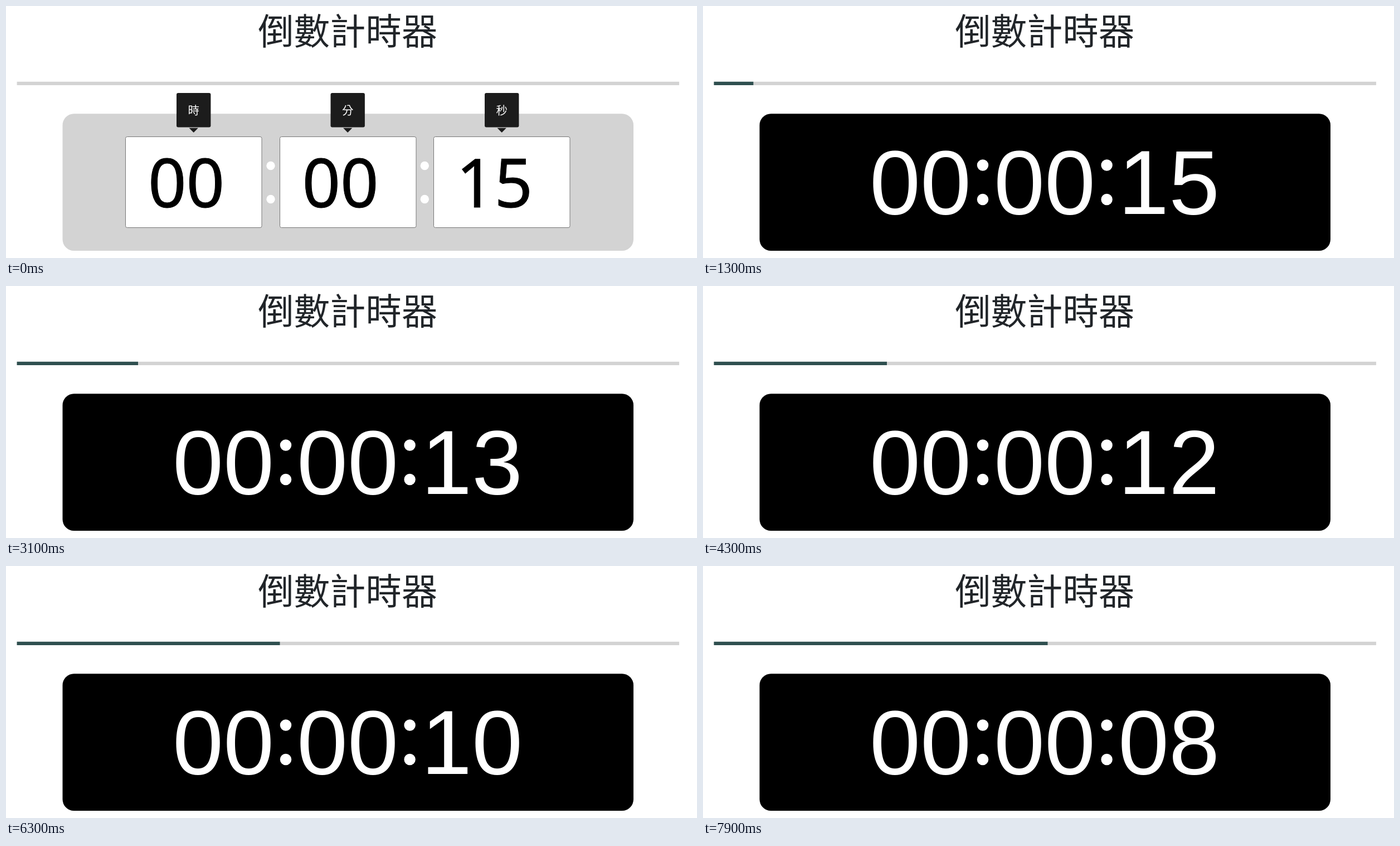
An HTML page that plays this animation: 1240x452 px, repeating every 8 s.

```html
<!DOCTYPE html>
<html lang="zh-TW">
<head>
<meta charset="utf-8">
<title>倒數計時器</title>
<style>
  html, body { margin: 0; width: 100%; height: 100%; overflow: hidden; background: #fff; }
  svg { display: block; width: 1240px; height: 452px; }
  text { white-space: pre; }
  .title, .tip text { font-family: "Noto Sans CJK TC", "Noto Sans CJK", sans-serif; text-anchor: middle; }
  .title { font-size: 64.4px; fill: #212529; }
  .tip { fill: #1c1c1c; }
  .tip text { font-size: 20.48px; fill: #fff; }
  .field { fill: #fff; stroke: #767676; }
  .value { font: 120px "Noto Sans", "Open Sans", sans-serif; text-anchor: middle; stroke: #000; }
  .digits { font: 163.84px "Liberation Sans", Arial, sans-serif; }
  #run { fill: #fff; }
</style>
</head>
<body>
<svg viewBox="0 0 1240 452">
  <text class="title" x="613.3" y="69">倒數計時器</text>
  <rect x="19.6" y="135.8" width="1188.4" height="6.2" fill="#d3d3d3"/>
  <rect id="bar" x="19.6" y="135.8" width="0" height="6.2" fill="#2f4f4f"/>
  <rect id="panel" x="101.5" y="193.2" width="1024.5" height="245.9" rx="20.48" fill="#d3d3d3"/>
  <g id="setup">
    <g fill="#fff">
      <circle cx="475" cy="286.5" r="7.7"/><circle cx="475" cy="346.5" r="7.7"/>
      <circle cx="751.3" cy="286.5" r="7.7"/><circle cx="751.3" cy="346.5" r="7.7"/>
    </g>
  </g>
  <g id="run" visibility="hidden">
    <text class="digits" x="299" y="373">00</text>
    <circle cx="502" cy="285.6" r="10.24"/><circle cx="502" cy="347" r="10.24"/>
    <text class="digits" id="min" x="522" y="373">00</text>
    <circle cx="724.6" cy="285.6" r="10.24"/><circle cx="724.6" cy="347" r="10.24"/>
    <text class="digits" id="sec" x="745" y="373">15</text>
  </g>
</svg>
<script>
  const LOOP = 8000, START = 500, STEP = 200;
  const LEFT = 19.6, WIDTH = 1188.4, TOTAL = 15;
  // [time in ms, right end of the progress bar]
  const path = [[500, 28], [1500, 106], [2100, 155], [2700, 204], [3900, 303],
                [4300, 330], [5100, 391], [6300, 491.5], [7500, 580], [7900, 618.5]];
  const $ = id => document.getElementById(id);
  const [bar, panel, setup, run, min, sec] =
    ['bar', 'panel', 'setup', 'run', 'min', 'sec'].map($);

  // One input box with its label above
  const field = (label, value, i) => {
    const x = 214 + 276.5 * i;
    return `
      <rect class="field" x="${Math.round(x) + .5}" y="234.5" width="244.5" height="163" rx="3"/>
      <text class="value" x="${x + 109.6}" y="361">${value}</text>
      <g class="tip">
        <rect x="${x + 92}" y="156" width="61.4" height="61.5" rx="3"/>
        <path d="M${x + 114.5} 218.7h16.4l-8.2 8.2z"/>
        <text x="${x + 122.7}" y="194.8">${label}</text>
      </g>`;
  };
  setup.innerHTML += field('時', '00', 0) + field('分', '00', 1) + field('秒', '15', 2);

  function barEnd(t) {
    let i = 1;
    while (i < path.length - 1 && t > path[i][0]) i++;
    const [t0, x0] = path[i - 1], [t1, x1] = path[i];
    return x0 + (x1 - x0) * (t - t0) / (t1 - t0);
  }

  function draw(t) {
    const running = t >= START;
    setup.setAttribute('visibility', running ? 'hidden' : 'visible');
    run.setAttribute('visibility', running ? 'visible' : 'hidden');
    panel.setAttribute('fill', running ? '#000' : '#d3d3d3');
    const done = running ? barEnd(t) - LEFT : 0;
    bar.setAttribute('width', done);
    const left = Math.ceil(TOTAL * (1 - done / WIDTH));
    sec.textContent = String(left).padStart(2, '0');
    // Kerned pairs are narrower, so the row is centred again
    const shift = (min.getComputedTextLength() - sec.getComputedTextLength()) / 2;
    run.setAttribute('transform', `translate(${shift})`);
  }

  let last = null;
  function tick() {
    const t = performance.now() % LOOP;
    const step = t < START ? 0 : START + Math.floor((t - START) / STEP) * STEP;
    if (step !== last) draw(last = step);
    requestAnimationFrame(tick);
  }
  tick();
</script>
</body>
</html>
```
